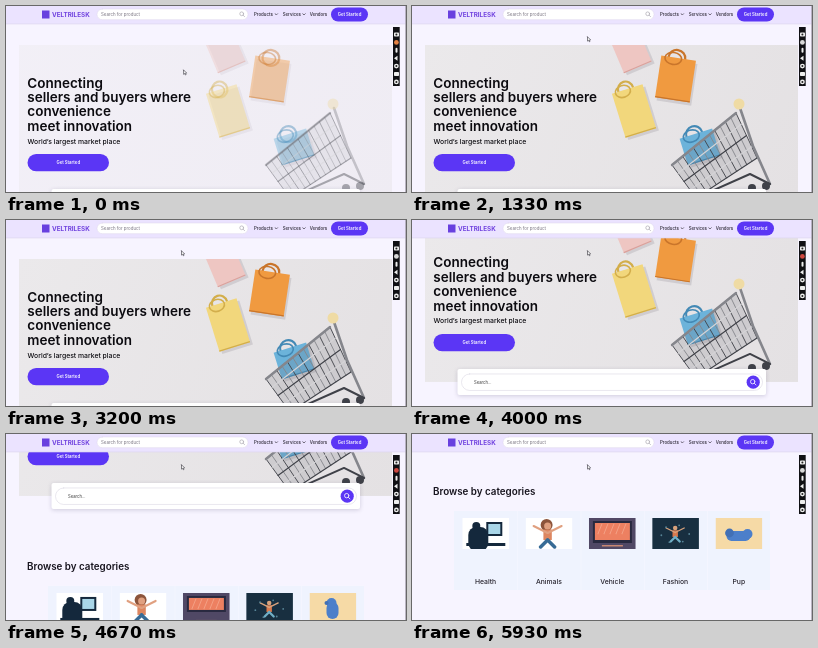
An HTML page with a canvas that plays this animation: 400 px wide and 186 px high, repeating every 6000 ms.

```html
<!DOCTYPE html>
<html lang="en">
<head>
<meta charset="utf-8">
<title>Marketplace</title>
<style>
html, body { margin: 0; width: 100%; height: 100%; overflow: hidden; background: #f7f4ff; }
canvas { display: block; width: 400px; height: 186px; }
</style>
</head>
<body>
<canvas id="stage"></canvas>
<script>
const W = 400, H = 186, LOOP = 6000, STEP = 1000 / 15;
const PURPLE = '#5b36f5', INK = '#0c0b10', NAVY = '#14283c';
const SCROLL_START = 3773, SCROLL_SPEED = 0.15, SCROLL_END = 209;
const canvas = document.getElementById('stage');
const ctx = canvas.getContext('2d');
const ratio = window.devicePixelRatio || 1;
canvas.width = W * ratio;
canvas.height = H * ratio;

const clamp = (v, a = 0, b = 1) => Math.min(b, Math.max(a, v));
const smooth = v => { v = clamp(v); return v * v * (3 - 2 * v); };
const lerp = (a, b, k) => a + (b - a) * k;
const mix = (p, q, k) => [lerp(p[0], q[0], k), lerp(p[1], q[1], k)];

function at(x, y, angle, paint) {
  ctx.save();
  ctx.translate(x, y);
  ctx.rotate(angle);
  paint();
  ctx.restore();
}

function rect(x, y, w, h, color) {
  ctx.fillStyle = color;
  ctx.fillRect(x, y, w, h);
}

function pill(x, y, w, h, color, r = h / 2, border) {
  ctx.beginPath();
  ctx.roundRect(x, y, w, h, r);
  ctx.fillStyle = color;
  ctx.fill();
  if (border) {
    ctx.strokeStyle = border;
    ctx.lineWidth = 0.5;
    ctx.stroke();
  }
}

function disc(x, y, r, color) {
  ctx.beginPath();
  ctx.arc(x, y, r, 0, Math.PI * 2);
  ctx.fillStyle = color;
  ctx.fill();
}

function ring(x, y, rx, ry, color, width) {
  ctx.beginPath();
  ctx.ellipse(x, y, rx, ry, 0, 0, Math.PI * 2);
  ctx.strokeStyle = color;
  ctx.lineWidth = width;
  ctx.stroke();
}

function shape(points, color) {
  ctx.beginPath();
  points.forEach(p => ctx.lineTo(...p));
  ctx.closePath();
  ctx.fillStyle = color;
  ctx.fill();
}

function line(points, color, width = 1) {
  ctx.beginPath();
  points.forEach(p => ctx.lineTo(...p));
  ctx.strokeStyle = color;
  ctx.lineWidth = width;
  ctx.lineJoin = ctx.lineCap = 'round';
  ctx.stroke();
}

function label(text, x, y, size, weight = 400, color = INK, align = 'left') {
  ctx.font = `${weight} ${size}px Inter, sans-serif`;
  ctx.textAlign = align;
  ctx.fillStyle = color;
  ctx.fillText(text, x, y);
}

function button(x, y, w, h) {
  pill(x, y, w, h, PURPLE);
  label('Get Started', x + w / 2, y + h / 2 + 1.6, 4.3, 600, '#fff', 'center');
}

function magnifier(x, y, r, color, width) {
  ring(x, y, r, r, color, width);
  line([[x + r * 0.7, y + r * 0.7], [x + r * 1.5, y + r * 1.5]], color, width);
}

function bag(x, y, w, h, angle, color, strap) {
  at(x, y, angle, () => {
    rect(-w / 2 + 2, -h / 2 + 3, w, h, 'rgba(90,85,95,.16)');
    ring(-w * 0.05, -h / 2, w * 0.24, 8, strap, 2.2);
    rect(-w / 2, -h / 2, w, h, color);
    ring(-w * 0.15, -h / 2 + 1, w * 0.24, 6, strap, 1.6);
    rect(-w / 2, h / 2 - 1.2, w, 1.2, strap);
  });
}

function cart() {
  const dark = '#3f4148', steel = '#85868c';
  const nose = [260, 159], grip = [324, 107], heel = [345, 152], toe = [284, 192];
  shape([nose, grip, heel, toe], 'rgba(110,112,120,.2)');
  for (let i = 0; i <= 12; i++) {
    line([mix(nose, grip, i / 12), mix(toe, heel, i / 12)], i % 2 ? steel : dark, 0.9);
  }
  for (let i = 0; i <= 4; i++) {
    line([mix(nose, toe, i / 4), mix(grip, heel, i / 4)], i % 2 ? '#d5d4d7' : dark, 1.1);
  }
  line([nose, grip], steel, 2.4);
  line([[328, 102], [341, 140], [358, 178]], steel, 2.6);
  line([toe, [338, 168], [358, 178]], dark, 2);
  [[340, 182], [354, 180]].forEach(p => disc(...p, 4, dark));
  disc(327, 98, 5.5, '#efdba4');
}

function photo(alpha) {
  ctx.save();
  ctx.beginPath();
  ctx.rect(13, 39, 373, 157);
  ctx.clip();
  ctx.globalAlpha = alpha;
  const wall = ctx.createLinearGradient(13, 39, 386, 196);
  wall.addColorStop(0, '#ebe9eb');
  wall.addColorStop(1, '#e4e1e3');
  rect(13, 39, 373, 157, wall);
  bag(218, 43, 30, 40, -0.4, '#eec6c2', '#d9a19c');
  bag(263.5, 73, 35, 42, 0.15, '#f09a40', '#c9752b');
  bag(222, 105, 32, 46, -0.3, '#f2d77c', '#d3ae4b');
  bag(288, 141, 34, 28, -0.3, '#6cb3da', '#4389b5');
  cart();
  ctx.restore();
}

function hero(t) {
  photo(lerp(0.42, 1, smooth((t - 50) / 650)));
  ['Connecting', 'sellers and buyers where', 'convenience', 'meet innovation']
    .forEach((text, i) => label(text, 21.3, 81.5 + i * 14.4, 13.5, 600));
  label('World’s largest market place', 21.5, 137.5, 6.85, 500);
  button(21.5, 148, 81.5, 17.3);
}

function searchCard() {
  ctx.save();
  ctx.shadowColor = 'rgba(70,60,100,.22)';
  ctx.shadowBlur = 4 * ratio;
  ctx.shadowOffsetY = ratio;
  pill(45.5, 183, 308.5, 26, '#fff', 2);
  ctx.restore();
  pill(49.5, 188, 301, 16.5, '#fff', 8.2, '#d5d1de');
  label('Search...', 62, 197.7, 4.2, 400, '#333');
  disc(341.2, 196.2, 6.6, PURPLE);
  magnifier(340.7, 195.7, 2.2, '#fff', 0.8);
}

function person(x, y, size, skin, top, legs) {
  disc(x, y, size * 0.5, skin);
  rect(x - size * 0.6, y + size * 0.5, size * 1.2, size * 1.5, top);
  [-1, 1].forEach(side => {
    line([[x, y + size], [x + side * size * 2, y]], skin, size * 0.3);
    line([[x, y + size * 2], [x + side * size, y + size * 3]], legs, size * 0.5);
  });
}

// Each picture is painted from the corner of a 47 by 31 box.
const cards = [
  ['Health', '#fff', () => {
    pill(6, 9, 20, 24, NAVY, 8);
    disc(14, 8, 4, NAVY);
    rect(24, 4, 16, 14, NAVY);
    rect(26, 6, 12, 10, '#a9d6e8');
    rect(4, 25, 39, 3, NAVY);
  }],
  ['Animals', '#fff', () => {
    disc(21, 7, 6, '#8c543b');
    person(22, 8, 7, '#e0a080', '#dd8660', '#376b96');
  }],
  ['Vehicle', '#504865', late => {
    rect(4, 3, 39, late ? 22 : 16, '#28293f');
    rect(6, 5, 35, late ? 17 : 12, '#ed8061');
    for (let x = 9; x < 36; x += 6) line([[x, 16], [x + 4, 6]], '#f4a085');
    rect(13, 27, 21, 1.5, '#c88772');
  }],
  ['Fashion', '#182f40', () => {
    person(23, 10, 4.5, '#d8a27c', '#d8794d', '#6faec5');
    for (let a = 0; a < 6; a++) disc(23 + 14 * Math.cos(a), 16 + 9 * Math.sin(a), 0.9, '#578496');
  }],
  ['Pup', '#f6daa6', late => {
    const coat = '#4c7fca';
    if (late) pill(11, 13, 24, 10, coat);
    else pill(17, 9, 12, 17, coat);
    disc(late ? 32 : 22, late ? 16 : 10, 5, coat);
    disc(late ? 14 : 17, late ? 15 : 10, late ? 4.4 : 2, '#4270b5');
  }]
];

function categories(t) {
  label('Browse by categories', 21, 270.3, 9.8, 600, '#18151f');
  rect(42, 286, 316, 79, '#eff3fe');
  cards.forEach(([name, back, paint], i) => {
    const x = 50.3 + i * 63.3;
    if (i) rect(x - 8.3, 286, 0.8, 79, '#f5f5ff');
    at(x, 293, 0, () => {
      ctx.beginPath();
      ctx.rect(0, 0, 46.7, 31);
      ctx.clip();
      rect(0, 0, 47, 31, back);
      paint(t > 5300);
    });
    label(name, x + 23.3, 358.8, 6.8, 500, '#25222c', 'center');
  });
}

function header() {
  rect(0, 0, W, 18, '#ebe3ff');
  rect(0, 17.6, W, 0.7, '#dcd4ee');
  rect(36, 4.5, 7.5, 8, '#6840df');
  label('VELTRILESK', 46, 10.8, 6.3, 700, '#7042df');
  pill(91, 3, 151, 10.7, '#fff', 5.3, '#ddd5ea');
  label('Search for product', 95, 10, 4.4, 400, '#77727f');
  magnifier(235.7, 7.8, 1.9, '#8d8895', 0.5);
  [['Products', 248], ['Services', 276.7], ['Vendors', 303.7]]
    .forEach(([text, x]) => label(text, x, 10.1, 4.4, 500, '#25212d'));
  [270.3, 298].forEach(x => line([[x - 1.3, 7.7], [x, 9], [x + 1.3, 7.7]], '#25212d', 0.6));
  button(325, 1.5, 37, 14);
}

function recorder(t) {
  const lamp = ['#d9d9d9', '#ce4840', '#e58244'][Math.floor(t / 800 + 2) % 3];
  rect(387, 21, 6.7, 59, '#101014');
  for (let i = 0; i < 7; i++) {
    const y = 28.5 + i * 7.9;
    if (i === 0 || i === 5) pill(388, y - 2, 5, 4, '#eee', 0.8);
    else if (i === 2) pill(389.5, y - 2.5, 2, 5, '#eee');
    else if (i === 3) shape([[388, y], [391.5, y - 2.5], [391.5, y + 2.5]], '#eee');
    else disc(390.4, y, 2.4, i === 1 ? lamp : '#eee');
    if (i % 2 === 0 && i !== 2) disc(390.4, y, 1, '#222');
  }
}

function pointer(t) {
  const k = smooth((t - 60) / 700);
  at(lerp(177.6, 175.5, k), lerp(64, 30.8, k), 0, () => {
    const arrow = [[0, 0], [0, 4.3], [1, 3.5], [1.8, 5], [2.5, 4.6], [1.9, 3.2], [3.1, 3.1], [0, 0]];
    shape(arrow, '#fff');
    line(arrow, '#33313a', 0.6);
  });
}

function draw(t) {
  const scroll = clamp((t - SCROLL_START) * SCROLL_SPEED, 0, SCROLL_END);
  ctx.setTransform(ratio, 0, 0, ratio, 0, 0);
  rect(0, 0, W, H, '#f7f4ff');
  at(0, -scroll, 0, () => {
    hero(t);
    searchCard();
    categories(t);
  });
  header();
  rect(399.2, 0, 0.8, H, '#aaa6b3');
  recorder(t);
  pointer(t);
}

const start = performance.now();
function frame() {
  const t = (performance.now() - start) % LOOP;
  draw(Math.floor((t + 4) / STEP) * STEP % LOOP);
  requestAnimationFrame(frame);
}
frame();
</script>
</body>
</html>
```
